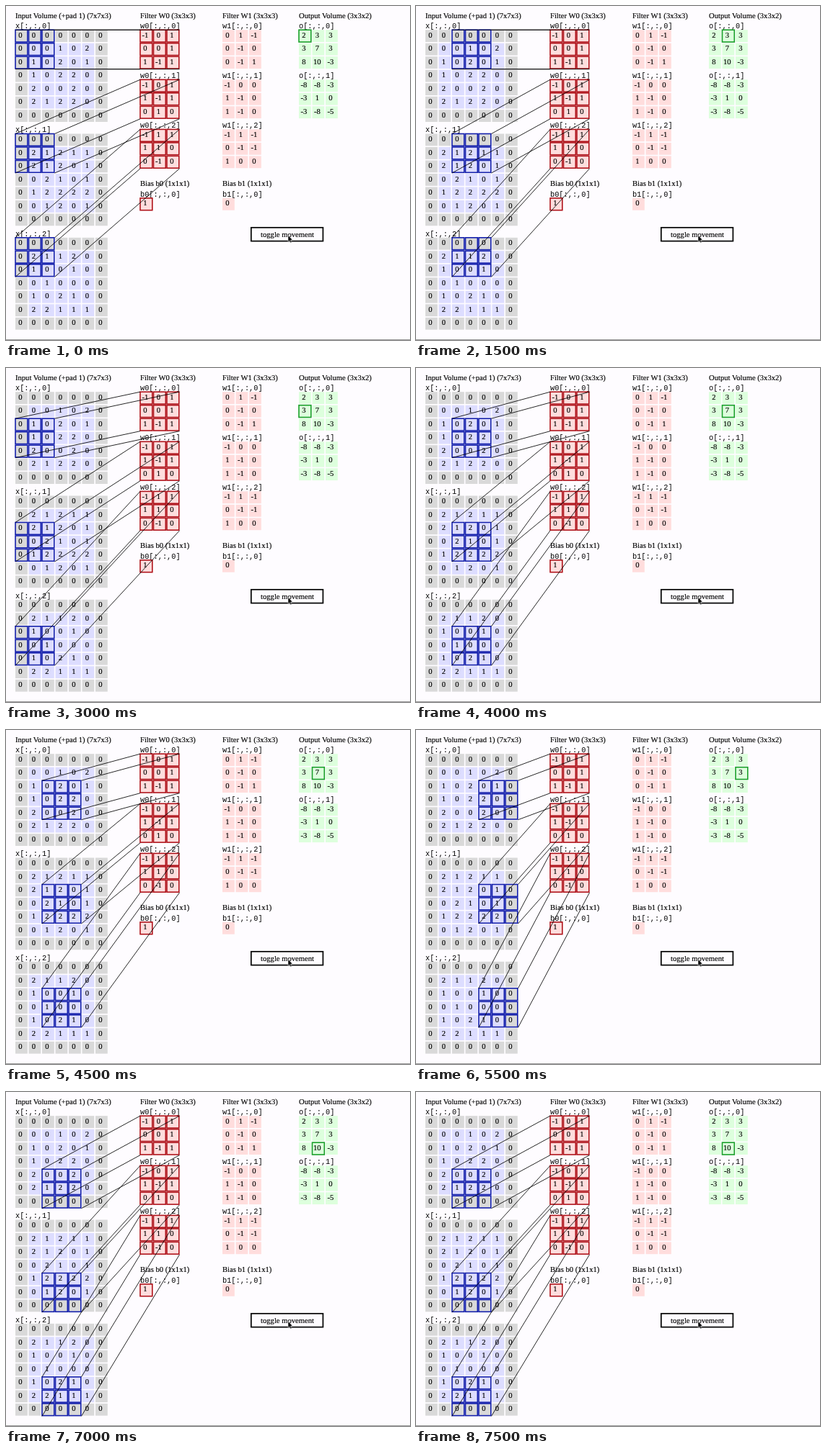
Write an HTML page that moves like this. It is 560 by 464 pixels and loops after 8000 ms.

```html
<!DOCTYPE html>
<html lang="en">
<head>
<meta charset="utf-8">
<title>Convolution demo</title>
<style>
  html, body { margin: 0; width: 560px; height: 464px; overflow: hidden; background: #fefcff; }
  svg { display: block; }
  text { font: 10.6px "Liberation Serif", "Times New Roman", serif; fill: #000; stroke: #000; stroke-width: .15px; }
  .value, .button { text-anchor: middle; }
  .label { font: 10.3px "Liberation Mono", "Courier New", monospace; stroke: none; }
  .focus rect { fill: none; stroke-width: 1.6px; }
  .links line { stroke: #000; stroke-width: .85px; }
</style>
</head>
<body>
<svg id="stage" width="560" height="464" viewBox="0 0 560 464"></svg>
<script>
const NS = 'http://www.w3.org/2000/svg';
const stage = document.getElementById('stage');
const PITCH = 18.5, CELL = 16.8, TOP = 33.2;
const INPUT_X = 13, W0_X = 186, W1_X = 300, OUT_X = 406;
const INPUT_GAP = 144.3, FILTER_GAP = 69.1, BIAS_Y = 266.9;
const SPAN = 2 * PITCH + CELL + .7;
const STEP_MS = 1000, LOOP_MS = 8000;

function add(parent, tag, attrs, content) {
  const node = document.createElementNS(NS, tag);
  for (const key in attrs) node.setAttribute(key, attrs[key]);
  if (content !== undefined) node.textContent = content;
  parent.appendChild(node);
  return node;
}

const write = (x, y, content, cls = 'title') =>
  add(stage, 'text', { x, y, class: cls }, content);

const box = (parent, x, y, attrs) =>
  add(parent, 'rect', { x, y, width: CELL, height: CELL, ...attrs });

// Rows are separated by "/", values by spaces.
const parse = s => s.split('/').map(row => row.trim().split(' '));

function grid(x, y, name, rows, colorAt) {
  write(x, y - 2.3, name, 'label');
  rows.forEach((row, r) => row.forEach((value, c) => {
    const cx = x + c * PITCH, cy = y + r * PITCH;
    box(stage, cx, cy, { fill: colorAt(r, c) });
    write(cx + 6.8, cy + 10.5, value, 'value');
  }));
}

function volume(x, title, name, slices, gap, colorAt) {
  write(x, 17.2, title);
  slices.forEach((s, i) => grid(x, TOP + i * gap, `${name}[:,:,${i}]`, parse(s), colorAt));
}

const pad = s => {
  const zeros = '0 0 0 0 0 0 0';
  return [zeros, ...s.split('/').map(row => `0 ${row} 0`), zeros].join('/');
};

const inputs = [
  '0 0 1 0 2/1 0 2 0 1/1 0 2 2 0/2 0 0 2 0/2 1 2 2 0',
  '2 1 2 1 1/2 1 2 0 1/0 2 1 0 1/1 2 2 2 2/0 1 2 0 1',
  '2 1 1 2 0/1 0 0 1 0/0 1 0 0 0/1 0 2 1 0/2 2 1 1 1'
].map(pad);
const filter0 = ['-1 0 1/0 0 1/1 -1 1', '-1 0 1/1 -1 1/0 1 0', '-1 1 1/1 1 0/0 -1 0'];
const filter1 = ['0 1 -1/0 -1 0/0 -1 1', '-1 0 0/1 -1 0/1 -1 0', '-1 1 -1/0 -1 -1/1 0 0'];
const outputs = ['2 3 3/3 7 3/8 10 -3', '-8 -8 -3/-3 1 0/-3 -8 -5'];

const pink = () => '#fdd', green = () => '#dfd';
const isEdge = n => n === 0 || n === 6;
const inputColor = (r, c) => isEdge(r) || isEdge(c) ? '#d9d9d9' : '#ddf';

volume(INPUT_X, 'Input Volume (+pad 1) (7x7x3)', 'x', inputs, INPUT_GAP, inputColor);
volume(W0_X, 'Filter W0 (3x3x3)', 'w0', filter0, FILTER_GAP, pink);
volume(W1_X, 'Filter W1 (3x3x3)', 'w1', filter1, FILTER_GAP, pink);
volume(OUT_X, 'Output Volume (3x3x2)', 'o', outputs, FILTER_GAP, green);
[[W0_X, 0, '1'], [W1_X, 1, '0']].forEach(([x, i, value]) => {
  write(x, 250.2, `Bias b${i} (1x1x1)`);
  grid(x, BIAS_Y, `b${i}[:,:,0]`, [[value]], pink);
});

// Highlights
const focus = add(stage, 'g', { class: 'focus' });
const patches = [0, 1, 2].map(() => add(focus, 'g', { stroke: '#1420ac' }));
const weights = add(focus, 'g', { stroke: '#b0141c' });
const result = box(focus, 0, 0, { stroke: '#18a028' });

function outlineBlock(parent, x, y) {
  for (let i = 0; i < 9; i++) {
    box(parent, x + i % 3 * PITCH, y + Math.floor(i / 3) * PITCH);
  }
}
patches.forEach((patch, i) => {
  outlineBlock(patch, 0, 0);
  outlineBlock(weights, W0_X, TOP + i * FILTER_GAP);
});
box(weights, W0_X, BIAS_Y);

// One link per corner of every slice
const links = add(stage, 'g', { class: 'links' });
const corners = [];
for (let slice = 0; slice < 3; slice++) {
  for (const dx of [0, SPAN]) for (const dy of [0, SPAN]) {
    const line = add(links, 'line', { x2: W0_X + dx, y2: TOP + slice * FILTER_GAP + dy });
    corners.push({ line, slice, dx, dy });
  }
}

// Button, pointer and page rule
add(stage, 'rect', { x: 339.8, y: 307.8, width: 99.6, height: 18.8, fill: '#fefcff', stroke: '#000', 'stroke-width': 1.7 });
write(390, 320.6, 'toggle movement', 'button');
add(stage, 'path', {
  d: 'M391 318.5v9l2-1.8 1.5 3.2 1.5-.7-1.4-3.1h2.7z',
  fill: '#000', stroke: '#fff', 'stroke-width': .5
});
add(stage, 'rect', { x: 0, y: 463, width: 560, height: 1, fill: '#999' });

function render(time) {
  const step = Math.floor(time % LOOP_MS / STEP_MS);
  const row = Math.floor(step / 3), col = step % 3;
  const x = INPUT_X + col * 2 * PITCH;
  const y = TOP + row * 2 * PITCH;

  patches.forEach((patch, i) =>
    patch.setAttribute('transform', `translate(${x} ${y + i * INPUT_GAP})`));
  corners.forEach(({ line, slice, dx, dy }) => {
    line.setAttribute('x1', x + dx);
    line.setAttribute('y1', y + slice * INPUT_GAP + dy);
  });
  result.setAttribute('x', OUT_X + col * PITCH);
  result.setAttribute('y', TOP + row * PITCH);
}

const start = performance.now();
function tick() {
  render(performance.now() - start);
  requestAnimationFrame(tick);
}
render(0);
requestAnimationFrame(tick);
</script>
</body>
</html>
```
